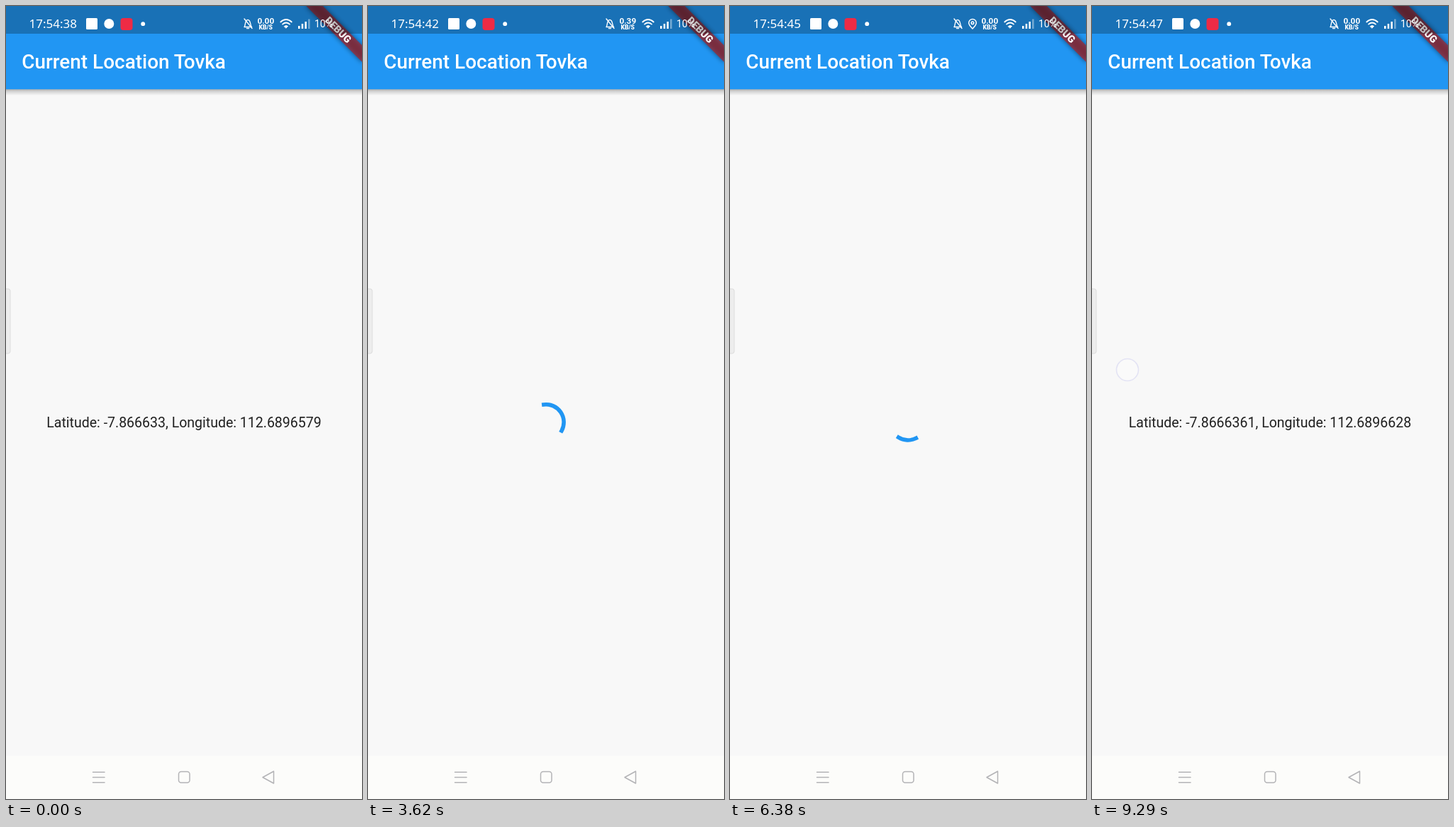
An HTML page for the animation above (9310 ms loop, 502 by 1116 pixels).

```html
<!DOCTYPE html>
<html lang="en">
<head>
<meta charset="utf-8">
<title>Current Location</title>
<style>
  html, body { margin: 0; width: 100%; height: 100%; overflow: hidden; background: #f8f8f8; }
  svg { display: block; width: 502px; height: 1116px; }
  text { font-family: Roboto, sans-serif; }
  .clock { font-family: "Noto Sans", sans-serif; }
  .line { fill: none; stroke-linecap: round; stroke-linejoin: round; }
</style>
</head>
<body>
<svg viewBox="0 0 502 1116">
  <defs>
    <filter id="soft" x="-20%" y="-80%" width="140%" height="260%">
      <feGaussianBlur stdDeviation="3.5"/>
    </filter>
    <linearGradient id="shade" x2="0" y2="1">
      <stop offset="0" stop-opacity=".3"/>
      <stop offset=".35" stop-opacity=".15"/>
      <stop offset="1" stop-opacity="0"/>
    </linearGradient>
  </defs>

  <rect width="502" height="1116" fill="#f8f8f8"/>

  <!-- app bar -->
  <rect y="117" width="502" height="9" fill="url(#shade)"/>
  <rect width="502" height="117.2" fill="#2196f3"/>
  <text x="22.3" y="88" font-size="27.9" font-weight="500" fill="#fff">Current Location Tovka</text>

  <!-- body -->
  <text id="place" x="251" y="592.8" font-size="19.52" text-anchor="middle" fill="#000" fill-opacity=".87"></text>
  <path id="spinner" fill="none" stroke="#2196f3" stroke-width="5.58" stroke-linecap="square"/>

  <!-- corner banner -->
  <g transform="translate(502 0) rotate(45)">
    <rect x="-55.8" y="39" width="111.6" height="16.7" fill-opacity=".5" filter="url(#soft)"/>
    <rect x="-55.8" y="39" width="111.6" height="16.7" fill="#b71c1c" fill-opacity=".627"/>
    <text y="52.4" font-size="14.2" font-weight="900" text-anchor="middle" fill="#fff">DEBUG</text>
  </g>

  <!-- status bar -->
  <rect width="502" height="39" fill-opacity=".25"/>
  <g fill="#fff">
    <text id="clock" class="clock" x="32.5" y="31" font-size="17"></text>
    <rect x="113" y="17" width="16" height="16" rx="1.5"/>
    <circle cx="145.3" cy="25" r="7"/>
    <rect x="161.5" y="17" width="17" height="17" rx="4" fill="#ee2b45"/>
    <circle cx="193.2" cy="25.2" r="2.9"/>
    <g id="bell" class="line" stroke="#fff" stroke-width="1.4">
      <path d="M336 29.5C338 27.5 336.5 19.5 341 19.5S344 27.5 346.5 29.5ZM339.5 31.5H342.5M336 18L347 31.5"/>
    </g>
    <g id="pin" class="line" stroke="#fff" stroke-width="1.5">
      <path d="M342 32C338.5 28.5 336.7 26.5 336.7 23.8A5.3 5.3 0 0 1 347.3 23.8C347.3 26.5 345.5 28.5 342 32Z"/>
      <circle cx="342" cy="23.8" r="1.8"/>
    </g>
    <text id="speed" x="366.3" y="25.3" font-size="11.8" font-weight="700" text-anchor="middle"></text>
    <text x="366.3" y="33.2" font-size="8.6" font-weight="800" text-anchor="middle">KB/S</text>
    <g class="line" stroke="#fff" stroke-width="1.7">
      <path d="M387.2 22.5Q395 15.5 402.8 22.5M390 25.7Q395 21.3 400 25.7"/>
      <path d="M392.5 28.5Q395 26.5 397.5 28.5L395 31Z" fill="#fff" stroke-width="1"/>
    </g>
    <rect x="412" y="28" width="2.5" height="4"/>
    <rect x="416.7" y="25" width="2.5" height="7"/>
    <rect x="421.4" y="22" width="2.5" height="10"/>
    <rect x="426.1" y="18.5" width="2.5" height="13.5" opacity=".4"/>
    <text x="435" y="30" font-size="14">10%</text>
  </g>

  <!-- edge handle and touch mark -->
  <rect x="-6" y="398" width="12" height="91" rx="3" fill="#ededed" stroke="#dcdcdc"/>
  <circle id="touch" cx="50" cy="512" r="15.5" fill="#fff" fill-opacity=".3" stroke="#e3e3f4" stroke-width="1.6"/>

  <!-- navigation bar -->
  <rect y="1055" width="502" height="61" fill="#fcfcfa"/>
  <g class="line" stroke="#b3b3b6" stroke-width="1.5">
    <path d="M122.5 1078.3H139M122.5 1085.5H139M122.5 1092.8H139"/>
    <rect x="243.5" y="1077.5" width="15.5" height="15.5" rx="3.5"/>
    <path d="M362 1085.5L377.5 1077V1094Z"/>
  </g>
</svg>

<script>
const LOOP = 9310, SPIN_FROM = 2712, SPIN_TO = 7930;
const CX = 251, CY = 585.8, R = 25.1;
const $ = id => document.getElementById(id);
const show = (id, on) => $(id).setAttribute('visibility', on ? 'visible' : 'hidden');
const within = (t, from, to) => t >= from && t < to;
const put = (id, text) => { if ($(id).textContent !== text) $(id).textContent = text; };

// cubic-bezier(.4, 0, .2, 1)
function ease(x) {
  if (x <= 0) return 0;
  if (x >= 1) return 1;
  let lo = 0, hi = 1, s = .5;
  for (let i = 0; i < 24; i++) {
    s = (lo + hi) / 2;
    const bx = 1.2 * (1 - s) ** 2 * s + .6 * (1 - s) * s * s + s ** 3;
    if (bx < x) lo = s; else hi = s;
  }
  return 3 * (1 - s) * s * s + s ** 3;
}

const point = a => `${(CX + R * Math.cos(a)).toFixed(2)} ${(CY + R * Math.sin(a)).toFixed(2)}`;

// Material indeterminate ring: 1333 ms stroke cycle, 2222 ms rotation
function ring(ms) {
  const p = ms / 1333 % 1, turn = ms / 2222 % 1;
  const head = ease(p * 2), tail = ease(p * 2 - 1);
  const start = Math.PI * (-.5 + 1.5 * tail + 2 * turn + .5 * p);
  const sweep = Math.max(1.5 * Math.PI * (head - tail), .001);
  return `M${point(start)}A${R} ${R} 0 ${+(sweep > Math.PI)} 1 ${point(start + sweep)}`;
}

function draw(t) {
  const spinning = within(t, SPIN_FROM, SPIN_TO);
  const located = within(t, 6340, 8340);
  put('clock', '17:54:' + (38 + Math.floor((t + 660) / 1000)));
  put('speed', within(t, 2320, 5320) ? '0.39' : '0.00');
  put('place', t < SPIN_FROM
    ? 'Latitude: -7.866633, Longitude: 112.6896579'
    : 'Latitude: -7.8666361, Longitude: 112.6896628');
  show('place', !spinning);
  show('spinner', spinning);
  if (spinning) $('spinner').setAttribute('d', ring(t - SPIN_FROM));
  show('pin', located);
  $('bell').setAttribute('transform', `translate(${located ? -20 : 0} 0)`);
  show('touch', t >= 9240);
}

const began = performance.now();
function tick() {
  draw((performance.now() - began) % LOOP);
  requestAnimationFrame(tick);
}
tick();
</script>
</body>
</html>
```
